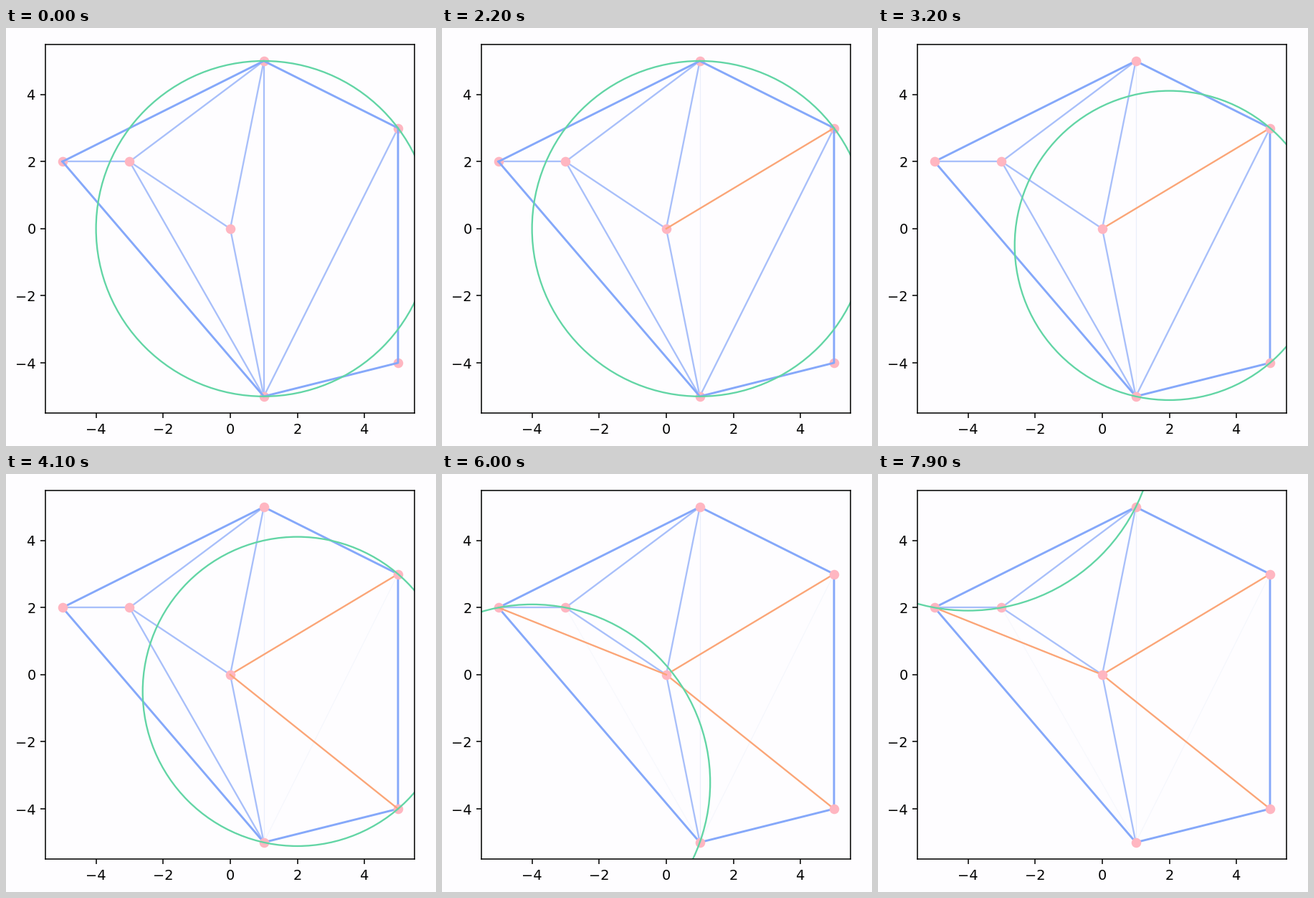
These frames come from a looping animation (600 by 583 pixels, 8 s). A matplotlib script:

```python
import numpy as np
import matplotlib.pyplot as plt
from matplotlib.animation import FuncAnimation

W, H, DPI = 600, 583, 100
STEP, LOOP = 100, 8000
SCALE = 1.393  # enlarges matplotlib's default sizes
THIN, THICK, TRACE = 1.2, 1.5, 0.6

PAPER = "#fefdff"
HULL, EDGE, FLIP, RING, DOT = "#85a8fa", "#a8bffa", "#fba577", "#62d5a5", "#ffb6c1"

A, B, C, D = (-5, 2), (-3, 2), (0, 0), (1, 5)
E, F, G = (1, -5), (5, 3), (5, -4)

# Triples whose circumcircle is shown, with start times in ms
RINGS = [(0, (D, F, E)), (2300, (F, G, E)), (4500, (A, B, E)), (6900, (A, B, D))]
# Removal time, old edge, new edge, colour of the trace left behind
FLIPS = [
    (1000, (D, E), (C, F), "#e9eefb"),
    (3300, (F, E), (C, G), "#f5f7fd"),
    (5600, (B, E), (A, C), "#f7f8fd"),
]
ADD_DELAY = 100


def circumcircle(points):
    p = np.array(points, float)
    m = np.column_stack([2 * p, np.ones(3)])
    cx, cy, k = np.linalg.solve(m, (p ** 2).sum(axis=1))
    return (cx, cy), np.sqrt(k + cx ** 2 + cy ** 2)


fig = plt.figure(figsize=(W / DPI, H / DPI), dpi=DPI, facecolor=PAPER)
left, top, width, height = 55.4, 22.6, 515, 514.6
ax = fig.add_axes([left / W, 1 - (top + height) / H, width / W, height / H],
                  facecolor=PAPER)
ax.set(xlim=(-5.5, 5.5), ylim=(-5.5, 5.5),
       xticks=range(-4, 5, 2), yticks=range(-4, 5, 2))
ax.tick_params(length=3.5 * SCALE, width=0.8 * SCALE, pad=3.5 * SCALE,
               labelsize=10 * SCALE, labelfontfamily="DejaVu Sans")
for spine in ax.spines.values():
    spine.set_linewidth(0.8 * SCALE)
    spine.set_zorder(9)


def segment(points, color, lw=THIN, z=1.0):
    return ax.plot(*zip(*points), color=color, lw=lw * SCALE, zorder=z)[0]


for pair in [(A, B), (B, D), (B, C), (C, D), (C, E)]:
    segment(pair, EDGE)
hull = segment([A, D, F, G, E, A], HULL, THICK)
old_edges = [segment(old, EDGE) for _, old, _, _ in FLIPS]
new_edges = [segment(new, FLIP) for _, _, new, _ in FLIPS]
ax.plot(*zip(A, B, C, D, E, F, G), "o", ms=7 * SCALE, mec="none", color=DOT, zorder=2)

circles = []
for _, triple in RINGS:
    center, radius = circumcircle(triple)
    circles.append(ax.add_patch(plt.Circle(center, radius, fill=False, ec=RING,
                                           lw=THIN * SCALE, zorder=5)))


def draw(i):
    t = i * STEP
    current = max(k for k, (start, _) in enumerate(RINGS) if t >= start)
    for k, circle in enumerate(circles):
        circle.set_visible(k == current)
    # Every new ring lifts the dots above the lines drawn so far
    hull.set_zorder(3 if current == 0 else 1.5)
    for k, (start, _, _, trace) in enumerate(FLIPS):
        gone = t >= start
        old_edges[k].set_color(trace if gone else EDGE)
        old_edges[k].set_linewidth((TRACE if gone else THIN) * SCALE)
        old_edges[k].set_zorder(0.5 if gone else 1)
        new_edges[k].set_visible(t >= start + ADD_DELAY)
        new_edges[k].set_zorder(4 if current == k else 1.2)
    return []


anim = FuncAnimation(fig, draw, frames=LOOP // STEP, interval=STEP,
                     repeat=True, repeat_delay=0, blit=False)
plt.show()
```
